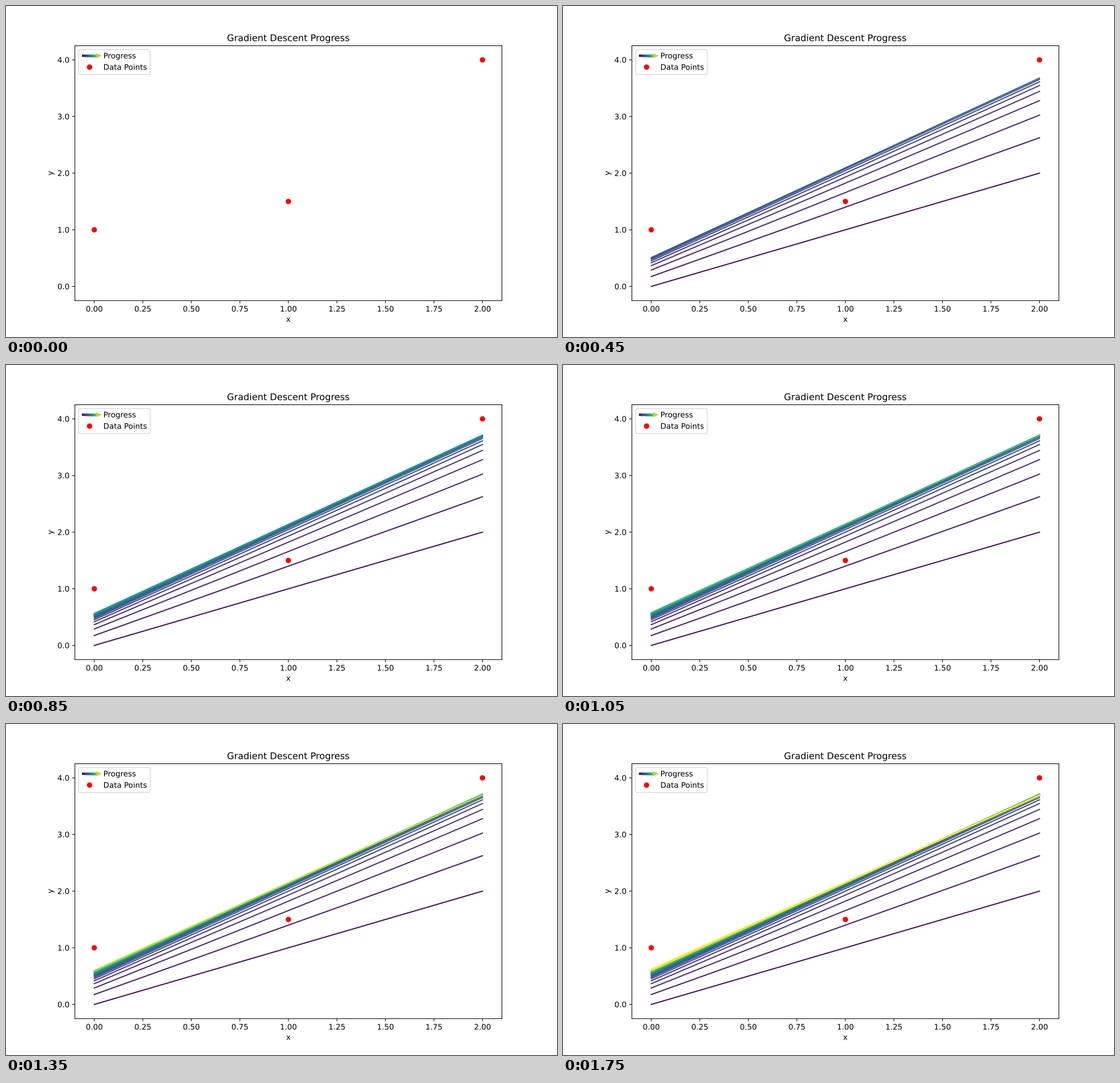
Recreate the animation shown at these times as a matplotlib script. Size 966 by 580 pixels, loop 1.8 s.

```python
import matplotlib.pyplot as plt
import numpy as np
from matplotlib.animation import FuncAnimation
from matplotlib.legend_handler import HandlerBase
from matplotlib.lines import Line2D
from matplotlib.patches import Polygon, Rectangle
from matplotlib.patheffects import Stroke
from matplotlib.ticker import FormatStrFormatter

W, H, DPI = 966, 580, 96.6
FRAMES, INTERVAL = 36, 50
RATE, COLOR_STEPS = 0.05, 30

# Smooth sub-pixel rendering: unsnapped strokes, text drawn as outlines.
plt.rcParams.update({
    "font.family": "DejaVu Sans",
    "text.hinting": "no_hinting",
    "path.snap": False,
    "path.effects": [Stroke(snap=False)],
})
cmap = plt.get_cmap("viridis")

x = np.array([0.0, 1.0, 2.0])
y = np.array([1.0, 1.5, 4.0])


def descend(steps):
    """Fitted values after each step of least-squares gradient descent."""
    bias, slope = 0.0, 1.0
    fits = []
    for _ in range(steps):
        fit = bias + slope * x
        fits.append(fit)
        err = fit - y
        bias -= RATE * err.sum()
        slope -= RATE * (err * x).sum()
    return fits


class GradientArrow(HandlerBase):
    """Legend key: a colour-graded shaft with an arrow head."""

    shaft, tip, half, head_half = 18.6, 26.0, 1.5, 3.2
    slices = 20

    def create_artists(self, legend, handle, xd, yd, width, height, size, trans):
        x0, mid = -xd, height / 2 - yd
        parts = []
        for k in range(self.slices):
            start = self.shaft * k / self.slices
            parts.append(Rectangle((x0 + start, mid - self.half),
                                   self.shaft - start, 2 * self.half,
                                   color=cmap(0.75 * k / (self.slices - 1)), lw=0))
        parts.append(Polygon([(x0 + self.shaft, mid - self.head_half),
                              (x0 + self.tip, mid),
                              (x0 + self.shaft, mid + self.head_half)],
                             color=cmap(0.88), lw=0))
        for part in parts:
            part.set_transform(trans)
        return parts


# The small margin guards against rounding down to one pixel less.
fig, ax = plt.subplots(figsize=((W + 0.01) / DPI, (H + 0.01) / DPI), dpi=DPI)
ax.set(xlim=(-0.1, 2.1), ylim=(-0.25, 4.25), xlabel="x", ylabel="y",
       title="Gradient Descent Progress", yticks=range(5))
ax.yaxis.set_major_formatter(FormatStrFormatter("%.1f"))

lines = [ax.plot(x, fit, color=cmap(min(1.0, (i + 1) / COLOR_STEPS)))[0]
         for i, fit in enumerate(descend(FRAMES - 1))]
points, = ax.plot(x, y, "ro", zorder=3)

progress = Line2D([], [])
ax.legend([progress, points], ["Progress", "Data Points"], loc="upper left",
          borderpad=0.42, labelspacing=0.55,
          handler_map={progress: GradientArrow()})


def update(n):
    for i, line in enumerate(lines):
        line.set_visible(i < n)
    return lines


anim = FuncAnimation(fig, update, frames=FRAMES, interval=INTERVAL,
                     repeat=True, repeat_delay=0)
plt.show()
```
